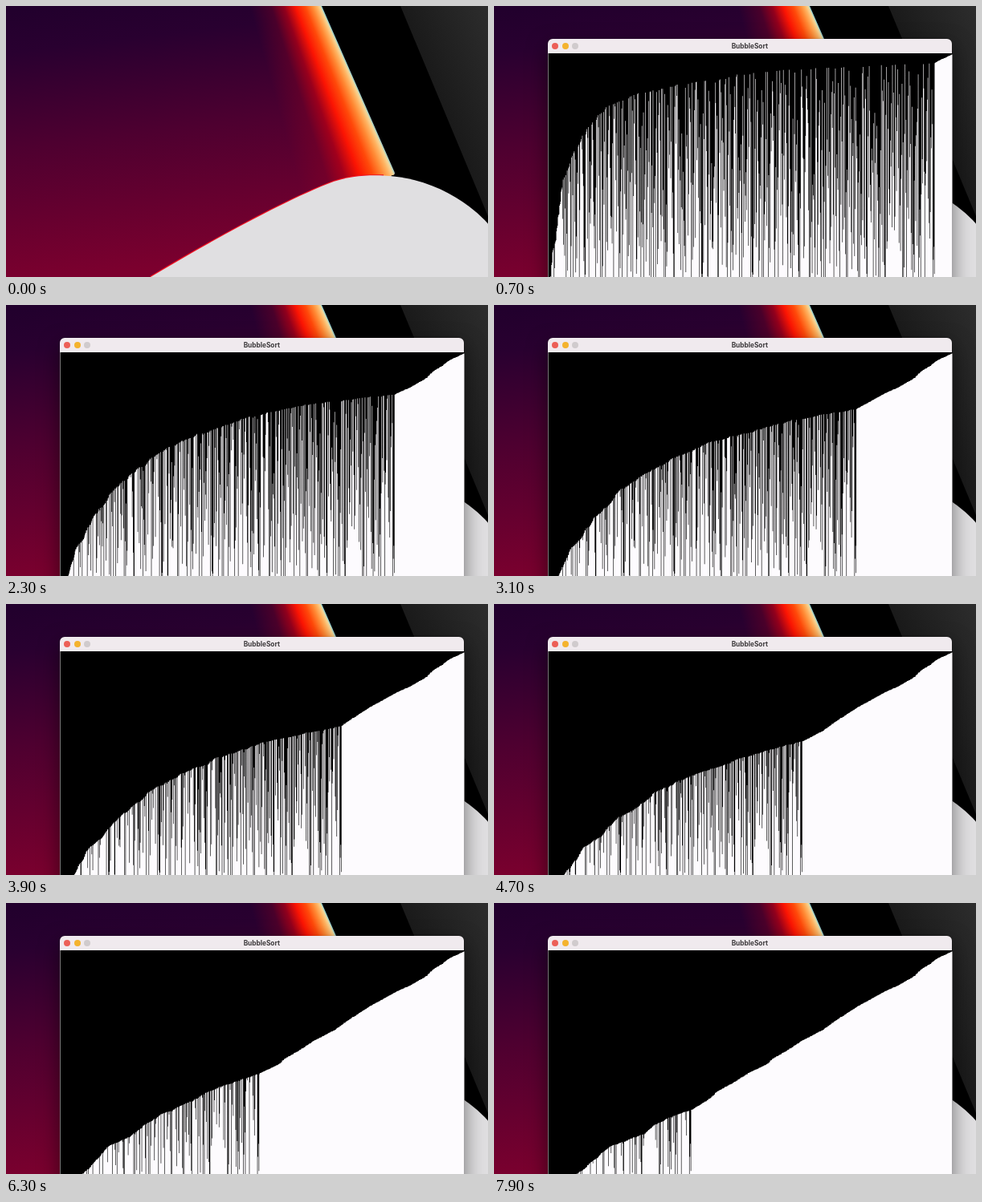
An HTML page with a canvas for the animation above (8000 ms loop, 600x338 px).

```html
<!DOCTYPE html>
<html lang="en">
<head>
<meta charset="utf-8">
<title>BubbleSort</title>
<style>
  html, body { margin: 0; width: 100%; height: 100%; overflow: hidden; background: #000; }
  .stage { position: relative; width: 600px; height: 338px; overflow: hidden; background: #000; }
  .sheet, .shapes { position: absolute; inset: 0; }
  /* The glow fans out slightly from a point far above the stage. */
  .sheet {
    clip-path: path("M0 0H393L483.5 207Q485 211 480 211L440 338H0Z");
    background:
      conic-gradient(at 151px -550px,
        #7fd3d8 156.25deg, #f6d698 156.45deg, #ffb361 156.8deg, #ff8a35 157.3deg,
        #ff4a0a 158.1deg, #fb1403 159.2deg, rgba(190, 0, 20, .7) 160.5deg,
        rgba(150, 0, 30, .3) 162deg, rgba(130, 0, 40, 0) 164.5deg),
      linear-gradient(173.3deg, #22002d 7px, #290030 58px, #4e0030 177px, #7c002e 347px);
  }
  .window {
    position: absolute; left: 67.2px; top: 41px; width: 503.3px; height: 332px;
    border-radius: 6px; background: #f0eaee;
    box-shadow: 0 10px 26px rgba(0, 0, 0, .5), 0 0 1px rgba(0, 0, 0, .6);
    visibility: hidden;
  }
  .title {
    position: absolute; left: 0; right: 1px; top: -.4px; height: 18px;
    font: 700 8.3px/18px Inter, "Open Sans", sans-serif;
    color: #3d3a3c; text-align: center;
  }
  .light { position: absolute; top: 5px; width: 8px; height: 8px; border-radius: 50%; }
  canvas { position: absolute; left: 0; top: 0; visibility: hidden; }
</style>
</head>
<body>
<div class="stage">
  <div class="sheet"></div>
  <svg class="shapes" width="600" height="338" viewBox="0 0 600 338">
    <linearGradient id="slate" gradientUnits="userSpaceOnUse" x1="515" y1="60" x2="610" y2="20">
      <stop offset="0" stop-color="#1a1a1a"/>
      <stop offset="1" stop-color="#2d2d2d"/>
    </linearGradient>
    <path d="M491 0H600V262Z" fill="url(#slate)"/>
    <path d="M180 338C250 296 340 246 400 222C428 211 450 211 470 211.5" fill="none" stroke="#f01020" stroke-width="2.4"/>
    <path d="M180 338C250 296 340 246 400 222C428 211 450 211 470 211.5C530 214 575 244 600 271.5V338Z" fill="#e0dfe1"/>
  </svg>
  <div class="window">
    <i class="light" style="left:4.9px;background:#ec5f57"></i>
    <i class="light" style="left:17.5px;background:#f4b32e"></i>
    <i class="light" style="left:30px;background:#d0cbcd"></i>
    <div class="title">BubbleSort</div>
  </div>
  <canvas width="600" height="338"></canvas>
</div>
<script>
const LOOP = 8000, STEP = 100, COUNT = 800, GROUPS = 40;
const LEFT = 67.5, WIDTH = 503, TOP = 59;

// Outline of the sorted bars, left to right.
const outline = [
  [67, 373], [117, 338], [130, 330], [150, 315], [165, 303], [180, 298], [200, 289],
  [213, 278], [235, 263], [245, 259], [270, 243], [278, 235], [300, 223], [317, 212],
  [340, 201], [347, 194], [365, 184], [383, 172], [410, 158], [425, 147], [451, 130],
  [487, 110], [503, 103], [516, 95.5], [524, 91], [530, 84], [543, 76], [552, 69], [573, 59]
];

let seed = 20;
function random() {
  seed = (seed * 1664525 + 1013904223) % 4294967296;
  return seed / 4294967296;
}

function outlineY(x) {
  const n = Math.max(1, outline.findIndex(p => p[0] >= x));
  const [x0, y0] = outline[n - 1], [x1, y1] = outline[n];
  return y0 + (y1 - y0) * (x - x0) / (x1 - x0);
}

// Deal the heights into even groups, shuffled within each group.
function makeBars() {
  return Array.from({ length: COUNT }, (_, i) => ({
    y: outlineY(LEFT + (i + .5 + (random() - .5) * 3) * WIDTH / COUNT),
    key: (i * 17) % GROUPS + random()
  })).sort((a, b) => a.key - b.key).map(bar => bar.y);
}

function bubblePass(bars, end) {
  for (let i = 0; i < end; i++) {
    if (bars[i] < bars[i + 1]) [bars[i], bars[i + 1]] = [bars[i + 1], bars[i]];
  }
}

function passesAt(ms) {
  const s = Math.max(0, ms / 1000 - .15);
  return Math.round(s * (63 + .48 * s));
}

const states = [];
const bars = makeBars();
for (let ms = 0, done = 0; ms < LOOP; ms += STEP) {
  for (; done < passesAt(ms); done++) bubblePass(bars, COUNT - 1 - done);
  states.push(bars.slice());
}

const canvas = document.querySelector("canvas");
const frame = document.querySelector(".window");
const ctx = canvas.getContext("2d");

function draw(step) {
  const visible = step > 0 ? "visible" : "hidden";
  canvas.style.visibility = frame.style.visibility = visible;
  ctx.clearRect(0, 0, 600, 338);
  ctx.fillStyle = "#000";
  ctx.fillRect(LEFT, TOP, WIDTH, 338 - TOP);
  ctx.fillStyle = "#fdfbfe";
  ctx.beginPath();
  ctx.moveTo(LEFT, 380);
  states[step].forEach((y, i) => {
    ctx.lineTo(LEFT + i * WIDTH / COUNT, y);
    ctx.lineTo(LEFT + (i + 1) * WIDTH / COUNT, y);
  });
  ctx.lineTo(LEFT + WIDTH, 380);
  ctx.fill();
}

const start = performance.now();
let shown = -1;
function tick() {
  const step = Math.floor((performance.now() - start) % LOOP / STEP);
  if (step !== shown) draw(shown = step);
  requestAnimationFrame(tick);
}
tick();
</script>
</body>
</html>
```
